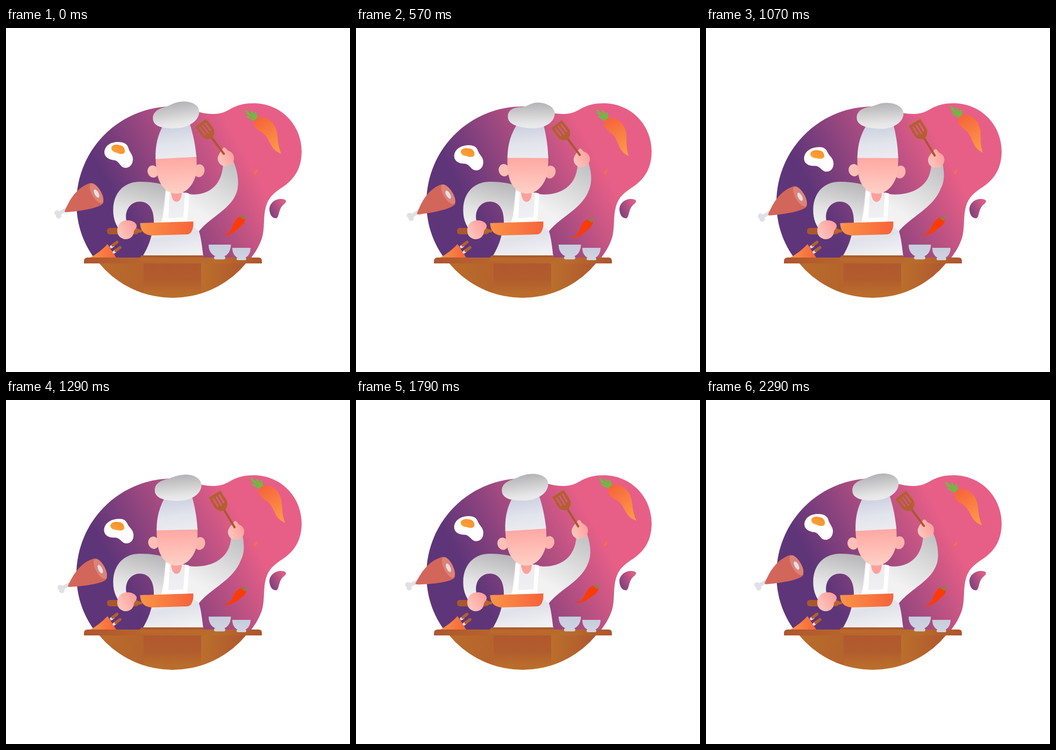
An HTML page for the animation above (2370 ms loop, 640 by 640 pixels).

```html
<!DOCTYPE html>
<html lang="en">
<head>
<meta charset="utf-8">
<title>Chef</title>
<style>
html, body { margin: 0; width: 100%; height: 100%; overflow: hidden; background: #fff; }
svg { display: block; width: 100vw; height: 100vh; }
</style>
</head>
<body>
<svg viewBox="0 0 640 640">
<defs>
  <linearGradient id="backdrop" gradientUnits="userSpaceOnUse" x1="220" y1="345" x2="440" y2="225">
    <stop stop-color="#5e3579"/><stop offset="1" stop-color="#e75f87"/>
  </linearGradient>
  <linearGradient id="drop" x1="0" y1=".8" x2="1" y2=".2">
    <stop offset=".1" stop-color="#84417d"/><stop offset=".9" stop-color="#dd5c86"/>
  </linearGradient>
  <linearGradient id="ballFill" x1=".45" y1="0" x2=".55" y2="1">
    <stop stop-color="#b2b2b4"/><stop offset=".8" stop-color="#e6e6e7"/><stop offset="1" stop-color="#ececed"/>
  </linearGradient>
  <linearGradient id="hatFill" x1=".4" y1="0" x2=".5" y2="1">
    <stop stop-color="#c9cedf"/><stop offset=".6" stop-color="#e3e5ec"/><stop offset="1" stop-color="#ebebf0"/>
  </linearGradient>
  <linearGradient id="skin" x1="0" y1="0" x2="0" y2="1">
    <stop stop-color="#fea6a1"/><stop offset="1" stop-color="#fed1c6"/>
  </linearGradient>
  <linearGradient id="hand" x1="0" y1=".8" x2="1" y2=".2">
    <stop stop-color="#fecabf"/><stop offset="1" stop-color="#fd9b9a"/>
  </linearGradient>
  <linearGradient id="leftSleeve" gradientUnits="userSpaceOnUse" x1="258" y1="286" x2="238" y2="368">
    <stop stop-color="#b9b9bb"/><stop offset=".7" stop-color="#e4e4e5"/><stop offset="1" stop-color="#eeeeef"/>
  </linearGradient>
  <linearGradient id="rightSleeve" gradientUnits="userSpaceOnUse" x1="425" y1="255" x2="370" y2="350">
    <stop stop-color="#c2c2c4"/><stop offset=".55" stop-color="#dededf"/><stop offset="1" stop-color="#f2f2f3"/>
  </linearGradient>
  <linearGradient id="torsoFill" gradientUnits="userSpaceOnUse" x1="300" y1="300" x2="325" y2="425">
    <stop stop-color="#e9e9ed"/><stop offset=".5" stop-color="#f1f1f3"/><stop offset=".7" stop-color="#e0e2e9"/><stop offset="1" stop-color="#f2f2f4"/>
  </linearGradient>
  <linearGradient id="orange"><stop stop-color="#fb9446"/><stop offset="1" stop-color="#f6633b"/></linearGradient>
  <linearGradient id="carrotFill" x1=".3" y1="0" x2=".8" y2="1">
    <stop stop-color="#f6663c"/><stop offset="1" stop-color="#fd9b47"/>
  </linearGradient>
  <linearGradient id="yolk" x1="1" y1="0" x2="0" y2="1">
    <stop stop-color="#f98d28"/><stop offset="1" stop-color="#fca63c"/>
  </linearGradient>
  <linearGradient id="woodLeft"><stop stop-color="#bb6f2b"/><stop offset="1" stop-color="#b5642c"/></linearGradient>
  <linearGradient id="woodMid" x1="0" y1="0" x2="0" y2="1">
    <stop stop-color="#b0582f"/><stop offset=".5" stop-color="#b25c2e"/><stop offset=".9" stop-color="#ba6d2b"/>
  </linearGradient>
  <linearGradient id="woodRight"><stop stop-color="#bb6f2b"/><stop offset=".65" stop-color="#b0592f"/></linearGradient>
  <linearGradient id="counter">
    <stop stop-color="#af562f"/><stop offset=".35" stop-color="#b7652d"/><stop offset=".75" stop-color="#b96c2b"/><stop offset="1" stop-color="#ae552f"/>
  </linearGradient>
  <linearGradient id="china" x1="0" y1="0" x2="0" y2="1">
    <stop stop-color="#c7ccdc"/><stop offset="1" stop-color="#d0d4e1"/>
  </linearGradient>
  <clipPath id="base"><circle cx="310" cy="324.500" r="177.500"/></clipPath>
</defs>

<path fill="url(#backdrop)" d="M310 146C337 146 351 157 376 159.500C397 161 405 158 417 151C430 143 445 140 461 140C511 140 550 180 550 230C550 259 538 280 516 295C497 307 486 317 482 339C479 355 481 372 477 388C472 406 461 423 447 438H172C146 407 131 369 131 325C131 226 211 146 310 146Z"/>
<path fill="url(#drop)" d="M490 336C491 323 506 315 518 319C523 321 521 325 517 328C506 336 509 354 502 354C494 354 490 345 490 336Z"/>
<path fill="#f5743a" d="M458 272L464 266 468 262 467 268 463 273 461 270Z"/>

<!-- bench -->
<g clip-path="url(#base)">
  <path fill="url(#woodLeft)" d="M130 437H256V510H130Z"/>
  <path fill="url(#woodMid)" d="M256 433H363V502H256Z"/>
  <path fill="url(#woodRight)" d="M363 437H480V510H363Z"/>
</g>
<path fill="url(#counter)" d="M145 438V434Q145 427 152 427H470Q476 427 476 433V438Z"/>

<!-- body -->
<path fill="url(#torsoFill)" d="M290 291C300 300 325 304 345 310L367 350 359 378C363 390 365 408 367 425H254C264 409 272 390 275 361L279 300Z"/>
<path id="sleeve" fill="url(#rightSleeve)"/>
<path fill="url(#leftSleeve)" d="M298 293C278 287 263 286 247 286C217 287 200 309 199.500 337C199 352 203 364 210 374L224 359C220 340 231 323 249 323C268 323 276 340 275 364L290 362Z"/>
<path fill="#fff" d="M297 303L305 305 302 354 330 352 333 306 341 308 337 362 288 364Q296 340 297 303Z"/>
<path fill="#fd9f9b" d="M307 305H327C327 316 324 323 317 323.500C310 323 308 315 307 305Z"/>

<!-- pan -->
<rect x="188" y="372" width="59" height="12" rx="5" fill="#aa562f"/>
<path fill="#b5652c" d="M236 371L253 376V380L236 382Z"/>
<path fill="url(#orange)" d="M249.500 363L348.500 360V368C347 377 344 384 336 384L271 386C257 385 250 377 249.500 363Z"/>
<path fill="url(#hand)" d="M207 377C207 366 214 358 224 358C233 357 242 362 243 367C244 372 240 374 238 378C238 387 231 393 222 393C213 392 207 386 207 377Z"/>

<!-- things on the bench -->
<path fill="url(#orange)" d="M157 427Q175 417 189 402L205 427Z"/>
<g stroke-width="5.500" stroke-linecap="round">
  <path stroke="#f0ddd3" d="M196 407L199 405M201 417L204 414.500"/>
  <path stroke="#b25f2d" d="M199 404L206.500 398.500M204.500 414L212 408.500"/>
</g>
<path fill="#ac5a2e" d="M252 423H366L369 427V434H249V427Z"/>
<path fill="#b8692b" d="M249 427H369V434H249Z"/>
<g fill="url(#china)">
  <path d="M377 403H418.500C418 417 411 426 398 426C385 426 377 417 377 403Z"/>
  <path d="M421 409H455C455 421 448 429 438 429C428 429 421 421 421 409Z"/>
</g>
<rect x="387" y="424.500" width="21" height="6" rx="3" fill="#cfd4e1"/>
<rect x="429" y="427" width="18" height="5" rx="2.500" fill="#cfd4e1"/>

<!-- head -->
<g id="head">
  <ellipse cx="275" cy="265" rx="10" ry="11.500" transform="rotate(-14 275 265)" fill="#fec0b6"/>
  <ellipse cx="361" cy="267.500" rx="10" ry="12" transform="rotate(14 361 267)" fill="#fdb4ad"/>
  <path fill="url(#skin)" d="M281 238H357C357 256 357 268 353 279C346 297 333 308 318 308C303 308 290 297 285 280C281 268 281 255 281 238Z"/>
  <path fill="url(#hatFill)" d="M299 178H347C353 200 356 220 357 241.500L281 242C281 217 287 197 299 178Z"/>
  <path id="ball" fill="url(#ballFill)"/>
</g>

<!-- raised hand -->
<g id="arm">
  <path fill="url(#hand)" d="M394 241C396 233 401 229 404 223C408 220 410 226 413 228C421 231 425 236 424 244C423 253 415 258 406 257C399 256 393 249 394 241Z"/>
  <g transform="translate(406 235) rotate(-37)">
    <path stroke="#aa572f" stroke-width="4" stroke-linecap="round" d="M0-42V-1"/>
    <path fill="#b2602e" fill-rule="evenodd" d="M-12.500-73H12.500L13-53C13-45 7-39 0-38C-7-39-13-45-13-53ZM-8-68V-50H-5V-68ZM-1.500-68V-48H1.500V-68ZM5-68V-50H8V-68Z"/>
  </g>
</g>

<!-- flying food -->
<g id="carrot">
  <path fill="none" stroke="#70b844" stroke-width="3.500" stroke-linecap="round" d="M466 173L450 165M466 171L446 154M466 170L457 156M467 168L464 158M463 167L448 159"/>
  <path fill="url(#carrotFill)" d="M461 176C463 166 474 163 485 168C497 174 504 186 505 201C506 214 508 225 512 234C505 231 500 228 495 221C489 211 486 201 477 195C468 190 460 184 461 176Z"/>
</g>
<g id="chili">
  <path fill="#fb3b05" d="M404 385C412 383 417 380 420.500 371C424 360 431 349 440 350C447 353 446 361 439 367C429 375 420 388 404 385Z"/>
  <path fill="none" stroke="#709048" stroke-width="2.500" stroke-linecap="round" d="M437 351L443 355M440 353L446 348.500"/>
</g>
<g id="egg">
  <path fill="#fff" d="M183 231C184 218 196 212 208 212C220 212 226 216 228 224C230 232 237 236 236 246C235 256 228 261 221 260C212 259 212 249 202 246C191 245 183 240 183 231Z"/>
  <path fill="url(#yolk)" d="M196 223C197 217 205 216 211 218C219 219 222 225 221 231C219 236 211 235 206 232C200 231 196 228 196 223Z"/>
</g>
<g id="meat">
  <path stroke="#e0e0e6" stroke-width="7" d="M115 336L97 346"/>
  <g fill="#e0e0e6"><circle cx="95" cy="344" r="5"/><circle cx="98" cy="349.500" r="5"/></g>
  <path fill="#d3665a" d="M109 341C116 326 127 299 155 289C164 285 182 310 181 325C178 333 150 339 120 342C113 343 109 343 109 341Z"/>
  <ellipse cx="168.500" cy="307.500" rx="21" ry="8.500" transform="rotate(60 168.500 307.500)" fill="#dd8277"/>
  <ellipse cx="168.500" cy="308" rx="8.500" ry="3.700" transform="rotate(62 168.500 308)" fill="#e3dfe7"/>
</g>
</svg>
<script>
const LOOP = 2370, STEP = 71.5, STEPS = 33;
const keys = [0, 4, 8, 15, 21, 25, 32];
const $ = id => document.getElementById(id);

// One row per key: x, y and turn about the pivot.
const parts = {
  carrot: { pivot: [478, 193], rows: [[0, 0, 0], [-1.5, 2, 2.6], [-1, 1.5, 5], [6.5, -4.5, 4.7], [10, -8.5, -.5], [8.5, -8.5, -1.5], [1, -.5, -.5]] },
  chili: { pivot: [425, 367], rows: [[0, 0, 0], [-3, 3.5, 1], [-4.5, 5, 1], [-1.5, 1, 5], [3.5, -5.5, 6], [5, -6.5, 5.4], [1, -1.5, .4]] },
  egg: { pivot: [209, 236], rows: [[0, 0, 0], [0, 2, 1], [0, 6, -5], [0, 9.5, -9], [0, 7.5, -8], [0, 4, -6], [0, 0, 0]] },
  meat: { pivot: [168, 308], rows: [[0, 0, 0], [.5, 0, -2], [3, 2, -2.2], [6.5, 6, 0], [6.5, 6.5, 3], [3.5, 4, 3.5], [0, 0, 0]] },
  arm: { pivot: [406, 235], rows: [[0, 0, 0], [3, 0, -1], [11, 2, 0], [20, 3, 5.5], [17, 2, 5.7], [8, 1, 5.3], [0, 0, .2]] },
  ball: { pivot: [322, 180], rows: [[.8, 0, -2], [0, 0, 0], [1.3, 0, 2], [0, 1, 0], [-.7, 1.2, -1], [0, .5, -1], [0, 0, -2]] }
};
const headTurn = [-2.6, 0, .7, .6, -2.2, -3.2, -2.7];
const hatDent = [.2, 1, 1, .3, 0, 0, .1];

// Smooth cyclic curve through the keyed values.
function curve(values, step) {
  const n = keys.length;
  const at = i => keys[(i + n) % n] + STEPS * Math.floor(i / n);
  const val = i => values[(i + n) % n];
  const slope = i => (val(i + 1) - val(i - 1)) / (at(i + 1) - at(i - 1));
  const i = keys.findLastIndex(k => k <= step);
  const span = at(i + 1) - at(i), u = (step - at(i)) / span, v = 1 - u;
  return v * v * (1 + 2 * u) * val(i) + u * u * (3 - 2 * u) * val(i + 1)
    + span * u * v * (v * slope(i) - u * slope(i + 1));
}

function sleevePath(x, y) {
  const k = x / 20, mix = (a, b) => a + (b - a) * k;
  return `M340 309C${mix(368, 375)} 313 ${mix(402, 417)} 300 ${mix(404, 419)} ${252 + y}`
    + `L${mix(423, 440)} ${248 + y}C${mix(431, 443)} 266 ${mix(434, 445)} ${mix(287, 283)} ${mix(430, 437)} ${mix(303, 298)}`
    + `C${mix(420, 423)} ${mix(337, 335)} 382 350 359 378L338 362Z`;
}

const ballPath = d =>
  `M279 166C279 154 289 ${148 + d} 303 ${145 + 3 * d}C${313 + 2 * d} ${142 + 5 * d} ${321 - d} 138 335 138`
  + `C352 138 366 146 366 158C366 173 348 187 322 186.500C298 186 279 181 279 166Z`;

function draw(now) {
  const step = Math.min(STEPS - 1, Math.floor((now % LOOP) / STEP + .1));
  for (const [id, { pivot, rows }] of Object.entries(parts)) {
    const [x, y, turn] = [0, 1, 2].map(c => curve(rows.map(r => r[c]), step));
    $(id).setAttribute("transform", `translate(${x} ${y}) rotate(${turn} ${pivot})`);
    if (id === "arm") $("sleeve").setAttribute("d", sleevePath(x, y));
  }
  $("head").setAttribute("transform", `rotate(${curve(headTurn, step)} 317 300)`);
  $("ball").setAttribute("d", ballPath(curve(hatDent, step)));
}

const start = performance.now();
function tick() {
  draw(performance.now() - start);
  requestAnimationFrame(tick);
}
tick();
</script>
</body>
</html>
```
